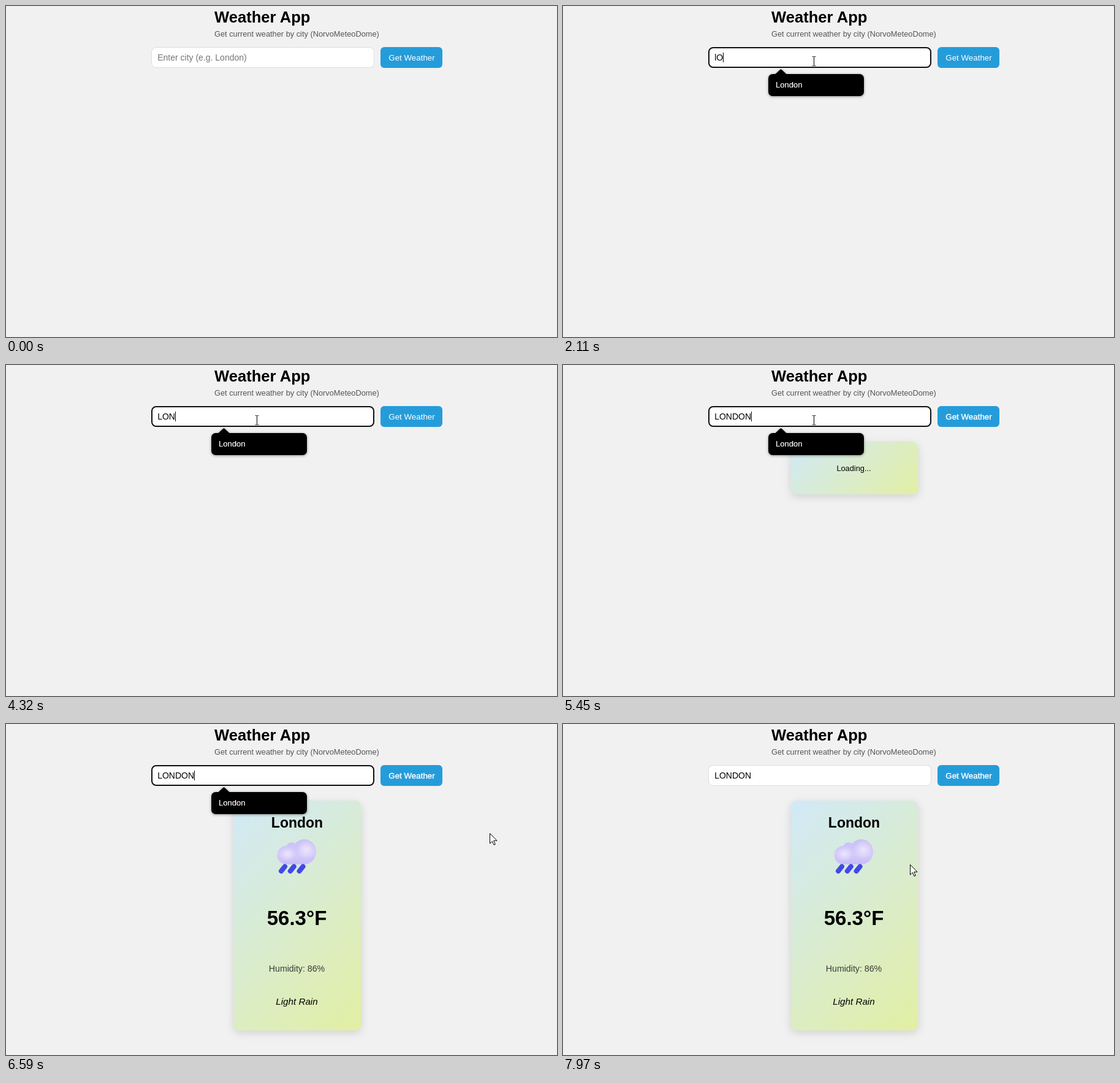
Animation of 899x540 px, one loop 8000 ms. Source, as an HTML page:

```html
<!DOCTYPE html>
<html lang="en">
<head>
<meta charset="utf-8">
<title>Weather App</title>
<style>
  html, body { margin: 0; width: 100%; height: 100%; overflow: hidden; background: #f1f1f1; }
  svg { display: block; font-family: "Liberation Sans", Arial, sans-serif; }
  text { white-space: pre; }
  .mid { text-anchor: middle; }
  .bold { font-weight: bold; }
  #card { filter: drop-shadow(0 4px 7px rgba(0, 0, 0, .13)); }
  #list { filter: drop-shadow(0 1px 2px rgba(0, 0, 0, .4)); }
  .typed { font-size: 14px; }
  .option { font-size: 13px; fill: #fff; stroke: #fff; stroke-width: .2px; }
  #field { fill: #fff; stroke: #ddd; }
  #field.focus { stroke: #101010; stroke-width: 2px; }
</style>
</head>
<body>
<svg width="899" height="540" viewBox="0 0 899 540">
  <defs>
    <linearGradient id="sky" gradientUnits="userSpaceOnUse">
      <stop offset="0" stop-color="#d1e9f8"/>
      <stop offset="1" stop-color="#e2efa3"/>
    </linearGradient>
    <radialGradient id="glow">
      <stop offset="0" stop-color="#ebe5fb"/>
      <stop offset="1" stop-color="#ebe5fb" stop-opacity="0"/>
    </radialGradient>
    <linearGradient id="cloud" x2="0" y2="1">
      <stop offset="0" stop-color="#c8c0f6"/>
      <stop offset=".6" stop-color="#d4cbfa"/>
      <stop offset="1" stop-color="#c8bcf8"/>
    </linearGradient>
  </defs>

  <text class="bold" x="340" y="27" font-size="25.6">Weather App</text>
  <text x="340" y="50" font-size="12.8" fill="#555">Get current weather by city (NorvoMeteoDome)</text>

  <rect id="field"/>
  <text id="hint" class="typed" x="247.2" y="89" fill="#757575">Enter city (e.g. London)</text>
  <text id="typed" class="typed" x="247.2" y="89"></text>
  <rect id="caret" y="76" width="1" height="16"/>

  <rect x="611" y="67" width="101" height="34" rx="6" fill="#259cda"/>
  <text id="label" class="mid" x="662" y="89" font-size="13.333" fill="#fff" stroke="#fff">Get Weather</text>

  <g id="card">
    <rect id="panel" x="371.5" y="125" width="208" rx="10" fill="url(#sky)"/>
  </g>
  <text id="loading" class="mid" x="474.5" y="173" font-size="12.8">Loading...</text>
  <g id="report" class="mid">
    <text class="bold" x="475" y="169" font-size="23">London</text>
    <path d="M457 229A14.500 15 0 0 1 457 199Q460 193 466 193Q470 193 472 195A19.500 20.500 0 1 1 487 229Z" fill="url(#cloud)"/>
    <circle cx="490" cy="205" r="16" fill="url(#glow)"/>
    <ellipse cx="459" cy="212" rx="14" ry="12" fill="url(#glow)"/>
    <path d="M455 232.500L449 240M469.800 232.500L463.800 240M484.600 232.500L478.600 240" stroke="#4249e6" stroke-width="8" stroke-linecap="round"/>
    <text class="bold" x="474.5" y="328" font-size="33">56.3°F</text>
    <text x="474.5" y="404" font-size="14.2" fill="#3a3a3a">Humidity: 86%</text>
    <text x="474.5" y="458" font-size="15.2" font-style="italic">Light Rain</text>
  </g>

  <g id="list">
    <path d="M345.500 112L354 104Q355.500 102.500 357 104L365.500 112Z"/>
    <rect id="menu" x="335" y="111" width="156" rx="7"/>
    <text class="option" x="347" y="133">London</text>
    <text id="second" class="option" x="347" y="169">Tlajomulco</text>
  </g>

  <path id="arrow" d="M.5 .5V17L4.300 13.300L7 19.300L9.300 18.300L6.700 12.300H12Z" fill="#fff" stroke="#000"/>
  <path id="beam" d="M-2 -7.500H0M1 -7.500H3M.5 -7V7M-2 7.500H0M1 7.500H3" fill="none" stroke="#000"/>
</svg>
<script>
const $ = id => document.getElementById(id);
const LOOP = 8000, TICK = 68, BLINK = 530, REFRESH = 70;
const FOCUS = 660, SEARCH = 5450, ANSWER = 5720, BLUR = 6860;

// Bursts of keys; "<" is backspace, pace bends the rhythm
const bursts = [
  { keys: 'lONDO', from: 1720, to: 2640, pace: .62 },
  { keys: '<<<<<', from: 2910, to: 3520, pace: 1 },
  { keys: 'LON', from: 3720, to: 4320, pace: 1 },
  { keys: 'DON', from: 4850, to: 5190, pace: 1 }
];
const strokes = bursts.flatMap(({ keys, from, to, pace }) => [...keys].map((key, i) =>
  ({ key, time: Math.round(from + (to - from) * (i / (keys.length - 1)) ** pace) })));

// Pointer moves along cubic Bezier curves
const moves = [
  { from: 70, to: 460, x: [817, 720, 500, 409], y: [511, 330, 95, 90] },
  { from: 6180, to: 6588, x: [409, 700, 1060, 789], y: [90, 600, 480, 178] },
  { from: 6930, to: 7970, x: [789, 500, 235, 566], y: [178, 470, 45, 229] }
];

const show = (id, on) => $(id).setAttribute('visibility', on ? 'visible' : 'hidden');
const set = (id, attrs) => { for (const k in attrs) $(id).setAttribute(k, attrs[k]); };
const bezier = ([a, b, c, d], u) => {
  const v = 1 - u;
  return Math.round(v * v * v * a + 3 * u * v * v * b + 3 * u * u * v * c + u * u * u * d);
};

function typedAt(t) {
  let text = '', last = FOCUS;
  for (const { key, time } of strokes) {
    if (time > t) break;
    if (key === '<') text = text.slice(0, -1);
    else { text += key; last = time; }
  }
  return { text, age: t - last };
}

function drawField(t) {
  const focused = t >= FOCUS && t < BLUR, { text, age } = typedAt(t);
  const inset = focused ? 1 : .5;
  $('field').classList.toggle('focus', focused);
  set('field', { x: 237 + inset, y: 67 + inset, width: 364 - 2 * inset, height: 34 - 2 * inset, rx: 8 - inset });
  $('typed').textContent = text;
  show('hint', !text);
  set('caret', { x: Math.floor(247.22 + (text ? $('typed').getComputedTextLength() : 0)) });
  show('caret', focused && Math.floor(age / BLINK) % 2 === 0);

  // The list reopens shortly after focus and after a first letter
  const untouched = t < strokes[0].time;
  const opening = text.length < 2 && age < REFRESH;
  const count = !focused || opening ? 0 : untouched ? 2 : text ? 1 : 0;
  show('list', count);
  show('second', count === 2);
  set('menu', { height: 36 * count });
}

function drawCard(t) {
  const open = t >= SEARCH, done = t >= ANSWER, h = done ? 375 : 86;
  show('card', open);
  show('loading', open && !done);
  show('report', done);
  // Endpoints of a 135deg gradient over the panel
  const r = (208 + h) / 4, cx = 475.5, cy = 125 + h / 2;
  set('panel', { height: h });
  set('sky', { x1: cx - r, y1: cy - r, x2: cx + r, y2: cy + r });
  set('label', { 'stroke-width': open ? .4 : 0 });
}

function drawPointer(t) {
  const move = moves.filter(m => m.from <= t).pop();
  let x = -50, y = -50;
  if (move) {
    const step = Math.floor((t - move.from) / TICK + .01) * TICK;
    const u = t >= move.to ? 1 : step / (move.to - move.from);
    const eased = u * u * (3 - 2 * u);
    x = bezier(move.x, eased);
    y = bezier(move.y, eased);
  }
  const over = x > 237 && x < 601 && y > 67 && y < 101;
  show('arrow', !over);
  show('beam', over);
  set(over ? 'beam' : 'arrow', { transform: `translate(${x} ${y})` });
}

const began = performance.now();
function frame() {
  const t = (performance.now() - began) % LOOP;
  drawField(t);
  drawCard(t);
  drawPointer(t);
  requestAnimationFrame(frame);
}
frame();
</script>
</body>
</html>
```
